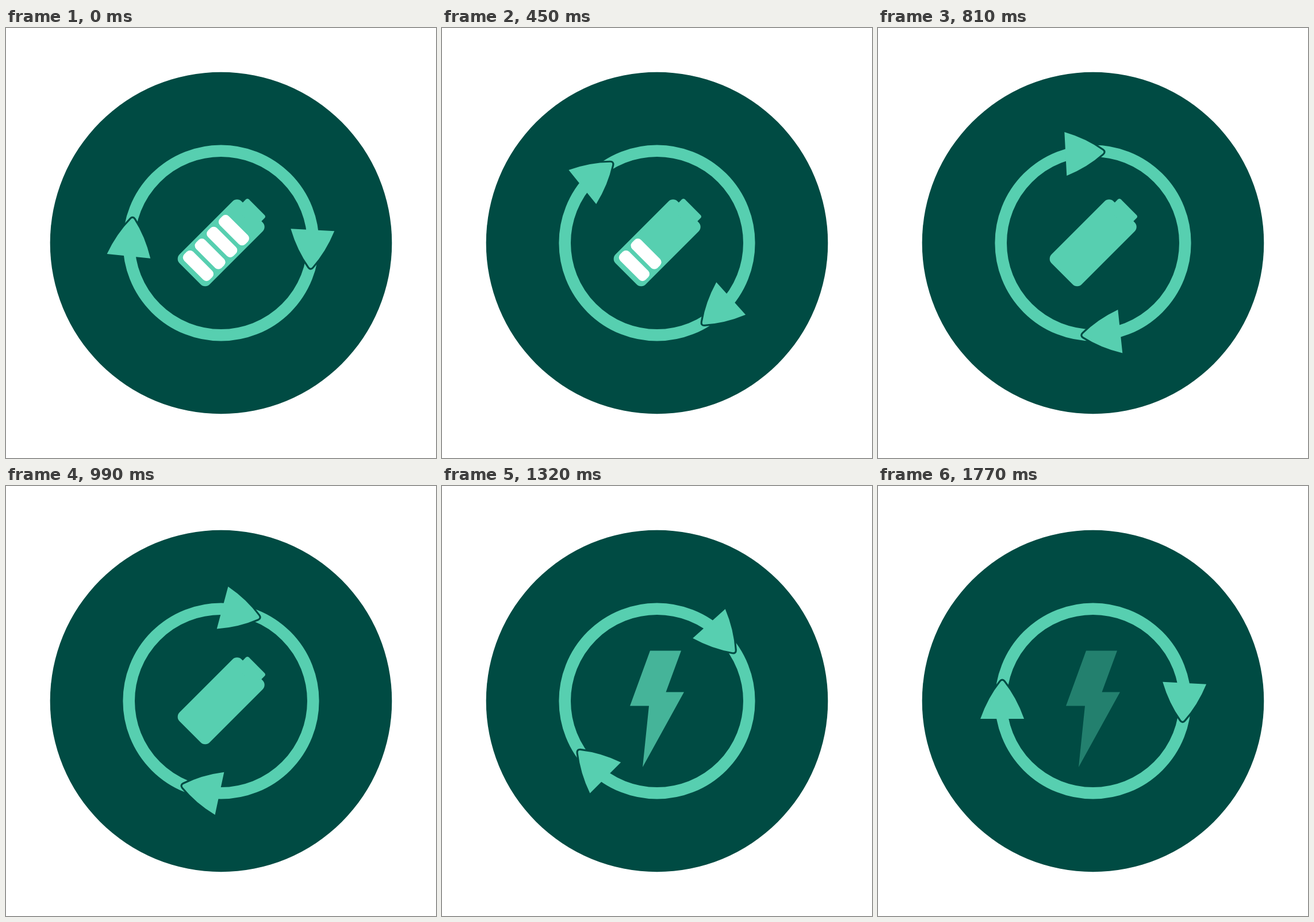
Animation of 748x748 px, one loop 1.8 s. Source, as an HTML page with a canvas:

```html
<!DOCTYPE html>
<html lang="en">
<head>
<meta charset="utf-8">
<title>Recharge cycle</title>
<style>
html, body { margin: 0; width: 100%; height: 100%; overflow: hidden; background: #fff; }
canvas { display: block; }
</style>
</head>
<body>
<canvas id="stage" width="748" height="748"></canvas>
<script>
const ctx = document.getElementById('stage').getContext('2d');
const LOOP = 1800, STEP = 30, BOLT_START = 1020, PULSE = 300;
const DARK = '#004b43', MINT = '#57cfb0', WHITE = '#ffffff';
const rad = deg => deg * Math.PI / 180;

const bolt = new Path2D('M362 286.5H416L389.5 358.5H421L349 489L360 382.5H327Z');
const sides = 'M-38 0Q-24.9 -37.3 -2.8 -64.5Q0 -68 2.8 -64.5Q24.9 -37.3 38 0';
const arrowEdge = new Path2D(sides);
const arrowBody = new Path2D(sides + 'Z');

function disc(r) {
  ctx.beginPath();
  ctx.arc(0, 0, r, 0, Math.PI * 2);
}

function box(x, y, w, h, r, color) {
  ctx.fillStyle = color;
  ctx.beginPath();
  ctx.roundRect(x, y, w, h, r);
  ctx.fill();
}

// Placed by the middle of its base, in polar form around the centre.
function arrow(angle, radius, tilt) {
  ctx.save();
  ctx.translate(radius * Math.cos(rad(angle)), radius * Math.sin(rad(angle)));
  ctx.rotate(rad(tilt));
  ctx.strokeStyle = DARK;
  ctx.lineWidth = 6.4;
  ctx.lineJoin = 'round';
  ctx.stroke(arrowEdge);
  ctx.fillStyle = MINT;
  ctx.fill(arrowBody);
  ctx.restore();
}

function battery(bars) {
  ctx.save();
  ctx.rotate(rad(-45));
  box(-76, -37, 152.5, 74, 11, MINT);
  box(60, -23, 28, 46, 4, MINT);
  for (let i = 0; i < bars; i++) box(-67 + 29.2 * i, -31.3, 22, 62.6, 8, WHITE);
  ctx.restore();
}

function boltAlpha(t) {
  const p = 1 - Math.abs((t - BOLT_START) % (2 * PULSE) / PULSE - 1);
  const smooth = p * p * (3 - 2 * p);
  return 0.8 * (p + smooth) / 2;
}

function draw(t) {
  ctx.setTransform(1, 0, 0, 1, 0, 0);
  ctx.fillStyle = WHITE;
  ctx.fillRect(0, 0, 748, 748);

  ctx.translate(374, 374);
  ctx.fillStyle = DARK;
  disc(297.3);
  ctx.fill();
  ctx.strokeStyle = MINT;
  ctx.lineWidth = 20.6;
  disc(160.3);
  ctx.stroke();

  const turn = t * 180 / LOOP;
  arrow(171.9 + turn, 162.2, 6 + turn);
  arrow(-8.1 + turn, 160.9, 183 + turn);

  if (t < BOLT_START) {
    battery(Math.max(0, 4 - Math.floor(t / 200)));
  } else {
    ctx.translate(-374, -374);
    ctx.globalAlpha = boltAlpha(t);
    ctx.fillStyle = MINT;
    ctx.fill(bolt);
    ctx.globalAlpha = 1;
  }
}

let start = null;
function tick(now) {
  if (start === null) start = now;
  draw(Math.floor((now - start) % LOOP / STEP + 1e-4) * STEP % LOOP);
  requestAnimationFrame(tick);
}
draw(0);
requestAnimationFrame(tick);
</script>
</body>
</html>
```
